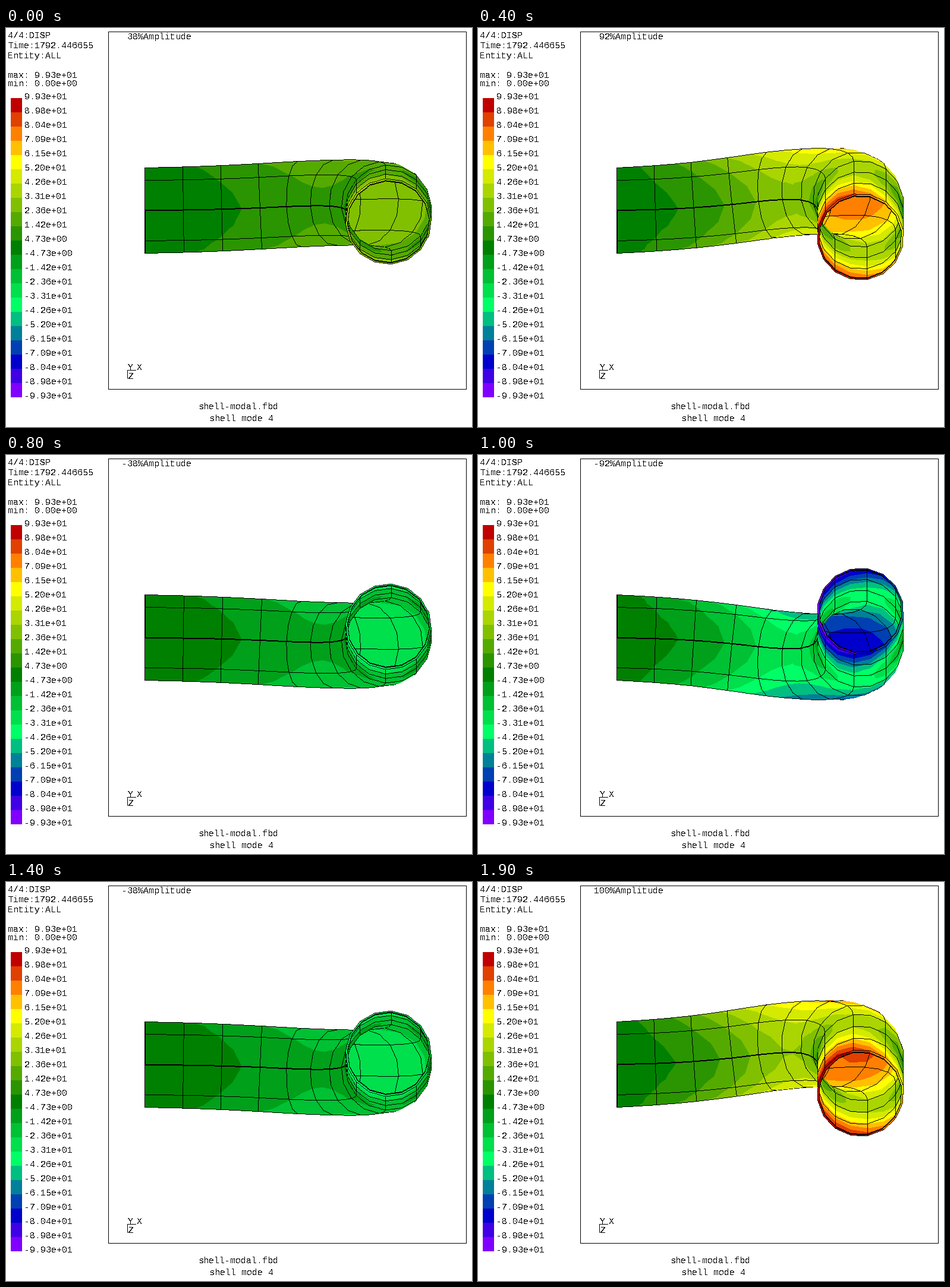
A matplotlib script for the animation above (2000 ms loop, 784 px wide and 672 px high).

```python
import numpy as np
import matplotlib.pyplot as plt
from matplotlib.animation import FuncAnimation
from matplotlib.patches import Rectangle

# Whole-pixel glyph stems
plt.rcParams.update({"text.hinting": "force_autohint", "text.hinting_factor": 1})

W, H, DPI = 784, 672, 100
STEPS = 20
X0, Y0, X1, Y1 = 220, 185, 730, 430      # raster window, centred on the pipe axis
LEFT, AXIS, RADIUS, WALL = 233.4, 307, 72, 3
ELEM, BEND = 64.5, 216                   # straight element length, elbow radius
TOP_VALUE = 99.3
BAND = 2 * TOP_VALUE / 21
VALUE_PER_PX = 1.65
BACKGROUND, LINE = -1, -2

# Mode shape at the mesh rings: drop, pitch about x, roll about z
DROP = [0, -4, -10, -18.5, -28.5, -34.5, -35, -27, -12, 8, 28, 48]
PITCH = [0, .037, .074, .11, .14, .155, .175, .215, .26, .285, .295, .3]
ROLL = [0, -.035, -.07, -.115, -.13, -.14, -.15, -.16, -.17, -.17, -.17, -.17]

STOPS = [0, 2, 4, 10, 14, 18, 20]
STOP_RGB = np.array([(192, 0, 0), (255, 128, 0), (255, 255, 0), (0, 128, 0),
                     (0, 255, 102), (0, 0, 204), (128, 0, 255)])
PALETTE = np.stack([np.interp(np.arange(21), STOPS, c) for c in STOP_RGB.T],
                   axis=1).round().astype(np.uint8)


def with_midnodes(nodes):
    """Insert a cubic midpoint between neighbouring values."""
    n = np.array(nodes, float)
    p = np.r_[2 * n[0] - n[1], n, 2 * n[-1] - n[-2]]
    out = np.empty(2 * len(n) - 1)
    out[::2] = n
    out[1::2] = (9 * (p[1:-2] + p[2:-1]) - p[:-3] - p[3:]) / 16
    return out


def centreline():
    s = np.arange(23) / 2
    theta = np.clip((s - 3) / 5, 0, 1) * np.pi / 2
    x = LEFT + ELEM * np.minimum(s, 3) + BEND * np.sin(theta)
    z = BEND * (1 - np.cos(theta)) + ELEM * np.maximum(s - 8, 0)
    return x, z, theta


def shell(radius, amp):
    """Deformed node positions (ring, angle, xyz) and result values."""
    cx, cz, theta = (c[:, None] for c in centreline())
    v, a, b = (with_midnodes(n)[:, None] for n in (DROP, PITCH, ROLL))
    phi = np.arange(16) * np.pi / 8
    dx = -radius * np.cos(phi) * np.sin(theta)
    dz = radius * np.cos(phi) * np.cos(theta)
    dy = radius * np.sin(phi) + 0 * theta
    move = np.stack([-b * dy, v + a * dz + b * dx, -a * dy], axis=-1)
    rest = np.stack([cx + dx, AXIS + dy, cz + dz], axis=-1)
    value = np.linalg.norm(move, axis=-1) * VALUE_PER_PX * amp
    return rest + amp * move, value


class Raster:
    def __init__(self):
        self.depth = np.full((Y1 - Y0, X1 - X0), -1e9)
        self.band = np.full(self.depth.shape, BACKGROUND)

    def triangle(self, p, val):
        (ax, ay, az), (bx, by, bz), (cx, cy, cz) = p
        det = (by - cy) * (ax - cx) + (cx - bx) * (ay - cy)
        if abs(det) < 1e-6:
            return
        xa, ya = np.ceil(p[:, :2].min(axis=0) - 1e-6).astype(int)
        xb, yb = np.floor(p[:, :2].max(axis=0) + 1e-6).astype(int) + 1
        x, y = np.arange(xa, xb)[None, :], np.arange(ya, yb)[:, None]
        u = ((by - cy) * (x - cx) + (cx - bx) * (y - cy)) / det
        w = ((cy - ay) * (x - cx) + (ax - cx) * (y - cy)) / det
        t = 1 - u - w
        z = u * az + w * bz + t * cz
        box = np.s_[ya - Y0:yb - Y0, xa - X0:xb - X0]
        hit = (np.minimum(np.minimum(u, w), t) > -1e-6) & (z > self.depth[box])
        level = np.rint((u * val[0] + w * val[1] + t * val[2]) / BAND).astype(int)
        self.depth[box][hit] = z[hit]
        self.band[box][hit] = np.minimum(level, 10)[hit]

    def quad(self, p, val):
        p, val = np.array(p), np.array(val)
        for k in ([0, 1, 2], [0, 2, 3]):
            self.triangle(p[k], val[k])

    def line(self, p, q, extra=None, bias=6):
        """Draw a one-pixel line, doubled by the offset `extra`."""
        n = int(np.abs(q - p)[:2].max()) + 2
        x, y, z = (p + (q - p) * np.linspace(0, 1, n)[:, None]).T
        col = np.rint(x).astype(int) - X0
        row = np.rint(y).astype(int) - Y0
        seen = z + bias >= self.depth[row, col]
        col, row = col[seen], row[seen]
        self.band[row, col] = LINE
        if extra:
            self.band[row + extra[1], col + extra[0]] = LINE


def render(amp):
    pos, val = shell(RADIUS, amp)
    inner, inner_val = shell(RADIUS - WALL, amp)
    r = Raster()
    last = len(pos) - 1
    for j in range(16):
        k = (j + 1) % 16
        for i in range(last):
            r.quad([pos[i, j], pos[i + 1, j], pos[i + 1, k], pos[i, k]],
                   [val[i, j], val[i + 1, j], val[i + 1, k], val[i, k]])
        r.quad([pos[last, j], inner[last, j], inner[last, k], pos[last, k]],
               [val[last, j], inner_val[last, j], inner_val[last, k], val[last, k]])
    for j in range(16):
        k = (j + 1) % 16
        for i in range(0, last + 1, 2):
            r.line(pos[i, j], pos[i, k], (1, 0) if i == 0 and j < 8 else None)
        r.line(inner[last, j], inner[last, k], (0, 1))
        if j % 2 == 0:
            for i in range(last):
                r.line(pos[i, j], pos[i + 1, j],
                       (0, -1) if j == 0 and i < 15 else None)
    return r.band


def picture(amp, bands):
    """Colour the bands; a negative swing is the mirrored pose."""
    sign = -1 if amp < 0 else 1
    band = bands[::sign]
    rgb = PALETTE[10 - sign * np.clip(band, 0, 10)]
    rgb[band == BACKGROUND] = 255
    rgb[band == LINE] = 0
    return rgb


AMPS = [round(float(np.sin((i + 1) * np.pi / 8)), 6) + 0.0 for i in range(STEPS)]
POSES = {m: render(m) for m in sorted({abs(a) for a in AMPS})}
PICTURES = [picture(a, POSES[abs(a)]) for a in AMPS]

fig = plt.figure(figsize=(W / DPI, H / DPI), dpi=DPI, facecolor="white")
ax = fig.add_axes([0, 0, 1, 1])
ax.axis("off")


def label(x, y, text):
    return ax.text(x, y, text, family="Liberation Mono", size=15 * 72 / DPI,
                   color="black", va="baseline", ha="left", antialiased=False)


def block(x, y, w, h, color="black"):
    ax.add_patch(Rectangle((x, y), w, h, lw=0, fc=color, antialiased=False))


label(3, 17, "4/4:DISP")
label(3, 34, "Time:1792.446655")
label(3, 51, "Entity:ALL")
label(3, 84, "max: 9.93e+01")
label(3, 98, "min: 0.00e+00")
for k in range(21):
    block(8, 118 + 24 * k, 19, 24, PALETTE[k] / 255)
for k in range(22):
    label(31, 120 + 24 * k, f"{TOP_VALUE - k * BAND:.2e}")

# View frame and axis marker
for y in (6, 608):
    block(172, y, 603, 1)
for x in (172, 774):
    block(x, 6, 1, 603)
block(204, 576, 1, 15)
block(204, 576, 15, 1)
label(205, 576, "Y")
label(220, 576, "X")
label(205, 591, "Z")
label(324, 642, "shell-modal.fbd")
label(342, 662, "shell mode 4")

swing = label(186, 19, "")
model = ax.imshow(PICTURES[0], extent=(X0, X1, Y1, Y0),
                  interpolation="nearest", aspect="auto", zorder=0)
ax.set_xlim(0, W)
ax.set_ylim(H, 0)


def update(i):
    model.set_data(PICTURES[i])
    swing.set_text(f"{100 * AMPS[i]:4.0f}%Amplitude")
    return model, swing


anim = FuncAnimation(fig, update, frames=STEPS, interval=100, repeat=True,
                     repeat_delay=0, blit=False)
plt.show()
```
